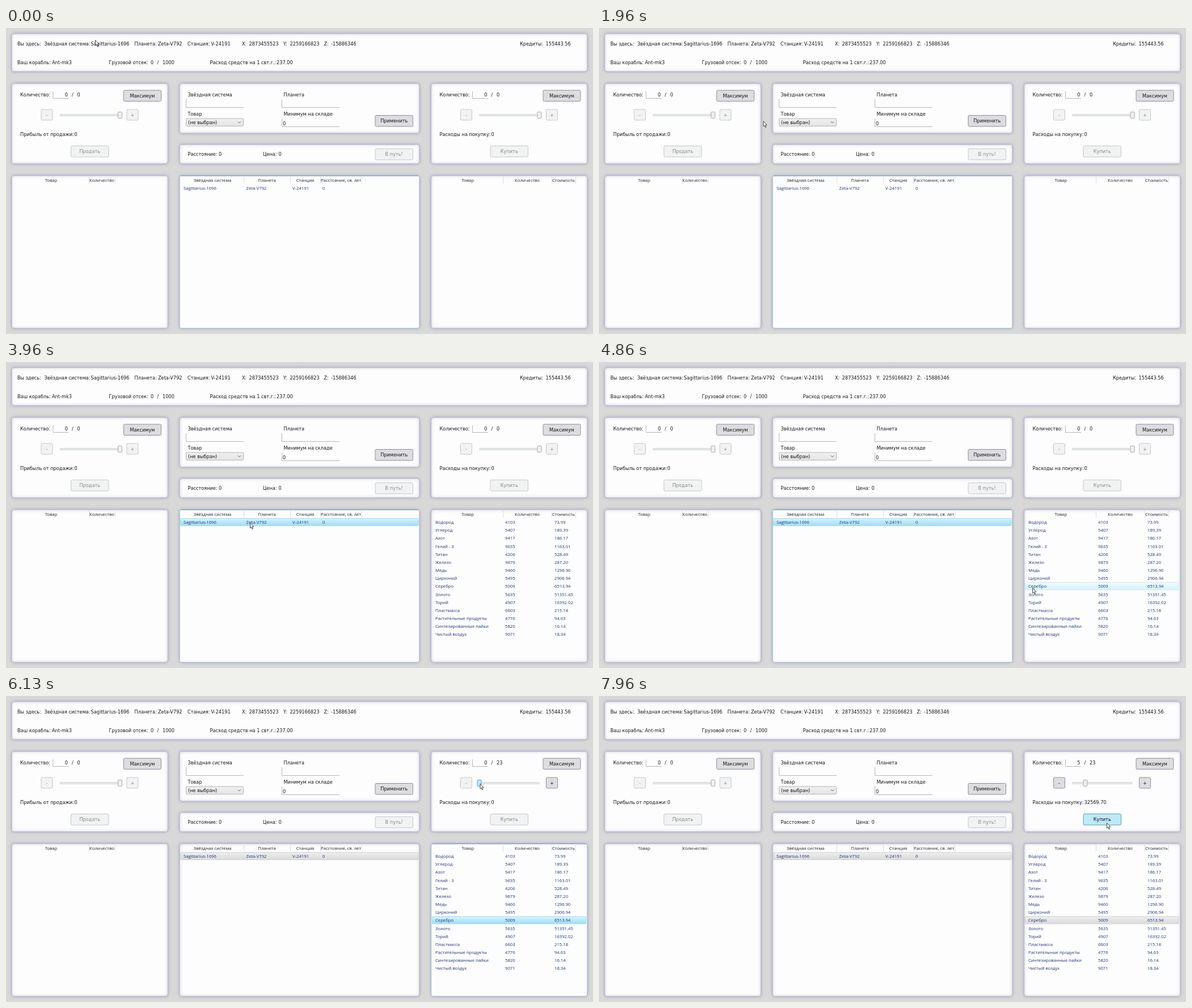
Recreate the animation shown at these times as an HTML page with a canvas. Size 1035x541 px, loop 8 s.

```html
<!DOCTYPE html>
<html lang="ru">
<head>
<meta charset="utf-8">
<style>
html, body { margin: 0; width: 100%; height: 100%; overflow: hidden; background: #d8d8d8; }
canvas { display: block; }
</style>
</head>
<body>
<canvas id="stage" width="1035" height="541"></canvas>
<script>
const g = document.getElementById('stage').getContext('2d');
const LOOP = 8000;
const UI = '8.2px "DejaVu Sans", sans-serif';
const LIST = '7.7px "Open Sans", "Noto Sans", sans-serif';
const INK = '#161616', NAVY = '#1d3282';
const PICK_STATION = 3900, PICK_GOODS = 5100, GRAB = 6250, DROP = 7100;
const PRICE = 6513.94, MAX = 23, STEP = 106 / MAX;

// Pointer stops: time, x, y
const path = [
  [0, 157, 21], [1000, 187, 30], [1700, 225, 70], [2500, 440, 400], [2800, 440, 400],
  [3000, 445, 391], [3600, 432, 300], [3850, 430, 284], [4000, 430, 284],
  [4750, 764, 399], [5150, 764, 399], [5460, 774, 262], [6000, 835, 154],
  [GRAB, 836, 155], [6700, 846, 154], [7050, 860, 156], [7330, 860, 156],
  [7960, 895, 224], [LOOP, 895, 224]
];

const goods = [
  ['Водород', 4103, '73.99'], ['Углерод', 5407, '189.39'], ['Азот', 9417, '186.17'],
  ['Гелий - 3', 9635, '1163.01'], ['Титан', 4206, '528.49'], ['Железо', 9879, '287.20'],
  ['Медь', 9460, '1296.90'], ['Цирконий', 5495, '2906.94'], ['Серебро', 5009, '6513.94'],
  ['Золото', 5635, '51351.45'], ['Торий', 4907, '16392.02'], ['Пластмасса', 6603, '215.18'],
  ['Растительные продукты', 4776, '94.63'], ['Синтезированные пайки', 5820, '16.14'],
  ['Чистый воздух', 9071, '18.34']
];
const SILVER = 8;

const tints = {
  hover: ['#f4fcff', '#d3f1fb', '#c5e8f5'],
  active: ['#d9f4ff', '#9bddf6', '#a5dcee'],
  idle: ['#efefef', '#d9d9d9', '#d2d2d2'],
  head: ['#e0f6ff', '#b9e6fa', '#a9d9ee']
};

let mouse = { x: 0, y: 0 };

function slope(i, k) {
  if (i < 1 || i > path.length - 2) return 0;
  const [a, b, c] = [path[i - 1], path[i], path[i + 1]];
  const p = (b[k] - a[k]) / (b[0] - a[0]), q = (c[k] - b[k]) / (c[0] - b[0]);
  return p * q > 0 ? 2 * p * q / (p + q) : 0;
}

function pointerAt(t) {
  let i = 0;
  while (i < path.length - 2 && path[i + 1][0] <= t) i++;
  const a = path[i], b = path[i + 1], d = b[0] - a[0], u = (t - a[0]) / d;
  const at = k => {
    const s = u * u * (3 - 2 * u);
    return a[k] + (b[k] - a[k]) * s
      + d * u * (1 - u) * (slope(i, k) * (1 - u) - slope(i + 1, k) * u);
  };
  return { x: at(1), y: at(2) };
}

const over = (x, y, w, h) =>
  mouse.x >= x && mouse.x < x + w && mouse.y >= y && mouse.y < y + h;

function text(s, x, y, { font = UI, color = INK, align = 'left' } = {}) {
  g.font = font;
  g.fillStyle = color;
  g.textAlign = align;
  g.fillText(s, x, y + 3);
}

function box(x, y, w, h, r, fill, stroke) {
  g.beginPath();
  g.roundRect(x + .5, y + .5, w - 1, h - 1, r);
  g.fillStyle = fill;
  g.fill();
  g.strokeStyle = stroke;
  g.lineWidth = 1;
  g.stroke();
}

function fade(y, h, [top, bottom]) {
  const f = g.createLinearGradient(0, y, 0, y + h);
  f.addColorStop(0, top);
  f.addColorStop(1, bottom);
  return f;
}

function tinted(x, y, w, h, tint) {
  box(x, y, w, h, 1, fade(y, h, tint), tint[2]);
}

function line(color, ...points) {
  g.beginPath();
  points.forEach(([x, y]) => g.lineTo(x, y));
  g.strokeStyle = color;
  g.lineWidth = 1;
  g.stroke();
}

function panel(x, y, w, h, focused) {
  g.save();
  g.shadowColor = 'rgba(125,125,175,.65)';
  g.shadowBlur = 5;
  box(x, y, w, h, 4, '#fdfdfd', '#c9cad6');
  g.restore();
  if (focused) {
    box(x, y, w, h, 3, '#fdfdfd', '#b4d3e2');
    line('#6fa3b8', [x + 2, y + .5], [x + w - 2, y + .5]);
  }
}

function button(label, x, y, w, h, on) {
  const lit = on && over(x, y, w, h);
  box(x, y, w, h, 2, lit ? '#bee9f8' : on ? '#dddddf' : '#f1f2f2',
    lit ? '#5d9bb8' : on ? '#8c8ca6' : '#c3c7cd');
  text(label, x + w / 2, y + h / 2, { color: on ? INK : '#898989', align: 'center' });
}

function field(x, y, w, h) {
  line('#b4b6bd', [x + .5, y], [x + .5, y + h - .5], [x + w, y + h - .5]);
}

function slider(x, y, thumb, on, lit) {
  box(x, y - 1, 107, 4, 1, '#e7eaea', '#d3d7da');
  box(thumb - 3.5, y - 5, 8, 12, 1, lit ? '#bce6fa' : on ? '#ececec' : '#f0f0f0',
    lit ? '#5aa2cc' : '#a5a8ad');
}

function trade(x, caption, action, value, max, thumb, held) {
  panel(x, 98, 275.5, 142);
  text('Количество:', x + 15, 118);
  field(x + 72.5, 112, 28, 13);
  text(value, x + 99, 118, { align: 'right' });
  text('/', x + 106, 118);
  text(max, x + 115.5, 118);
  button('Максимум', x + 197, 109.5, 67, 20.5, true);
  button('-', x + 51.5, 143.5, 21, 20, value > 0);
  button('+', x + 202.5, 143.5, 21, 20, max > value);
  const lit = max > 0 && (held || over(thumb - 4, 148, 8, 12));
  slider(x + 84.5, 153, thumb, max > 0, lit);
  text(caption, x + 15, 188);
  text(value ? (value * PRICE).toFixed(2) : 0, x + (x > 500 ? 106 : 110.5), 188);
  button(action, x + 104, 208, 67.5, 20.5, value > 0);
}

// Column heads: label, left edge, right edge
function heads(cols) {
  for (const [label, a, b] of cols) {
    if (over(a, 262, b - a, 14)) tinted(a, 262, b - a, 14, tints.head);
    line('#dcdde2', [b + .5, 263], [b + .5, 275]);
    text(label, (a + b) / 2, 269, { font: LIST, align: 'center', color: '#20232b' });
  }
}

function row(x, w, i, cells, picked, focused) {
  const y = 283 + i * 14.17;
  const hot = over(x, y - 7, w, 14);
  const tint = picked ? (focused ? tints.active : tints.idle) : hot && tints.hover;
  if (tint) tinted(x, y - 7, w, 14, tint);
  for (const [s, cx] of cells) text(s, cx, y, { font: LIST, color: NAVY });
}

function header() {
  panel(10, 10, 1015, 67);
  [['Вы здесь:', 20], ['Звёздная система:', 67.5], ['Sagittarius-1696', 149.5],
   ['Планета:', 226.5], ['Zeta-V792', 268], ['Станция:', 320], ['V-24191', 361.5],
   ['X:', 416], ['2873455523', 428.5], ['Y:', 489], ['2259166823', 500.5],
   ['Z:', 560.5], ['-15886346', 573], ['Кредиты:', 906], ['155443.56', 951.5]
  ].forEach(([s, x]) => text(s, x, 28));
  [['Ваш корабль:', 20], ['Ant-mk3', 81], ['Грузовой отсек:', 181.5], ['0', 255],
   ['/', 266.5], ['1000', 276], ['Расход средств на 1 свт.г.:', 359.5], ['237.00', 477]
  ].forEach(([s, x]) => text(s, x, 61));
}

function search() {
  panel(306, 98, 423, 88);
  text('Звёздная система', 320.5, 118);
  text('Планета', 489.5, 118);
  text('Товар', 320.5, 151.5);
  text('Минимум на складе', 489.5, 151.5);
  field(317, 126, 102, 15);
  field(486, 126, 102, 15);
  field(486, 160, 102, 15);
  text('0', 488, 169);
  box(317, 159.5, 102, 14.5, 1, fade(160, 14, ['#f0f0f0', '#e4e4e4']), '#b5b5b8');
  text('(не выбран)', 321, 167);
  line('#555', [409, 165.5], [411.5, 168], [414, 165.5]);
  button('Применить', 650.5, 154, 67.5, 20.5, true);

  panel(306, 206, 423, 34);
  text('Расстояние:', 320.5, 223);
  text('0', 375, 223);
  text('Цена:', 453, 223);
  text('0', 480.5, 223);
  button('В путь!', 650.5, 213, 67.5, 20.5, false);
}

function lists(t) {
  const stationFocus = t < PICK_GOODS, goodsFocus = !stationFocus && t < GRAB;
  panel(10, 261, 275.5, 270);
  heads([['Товар', 13, 146], ['Количество', 146, 192]]);

  panel(306, 261, 423, 270, stationFocus);
  heads([['Звёздная система', 309, 419], ['Планета', 419, 501],
         ['Станция', 501, 554], ['Расстояние, св. лет', 554, 627]]);
  row(307, 420.5, 0, [['Sagittarius-1696', 313], ['Zeta-V792', 423.5],
    ['V-24191', 505], ['0', 558]], t >= PICK_STATION, stationFocus);

  panel(749.5, 261, 275.5, 270, goodsFocus);
  heads([['Товар', 752.5, 876], ['Количество', 876, 962], ['Стоимость', 962, 1004]]);
  if (t < PICK_STATION) return;
  goods.forEach(([name, amount, price], i) =>
    row(751, 272, i, [[name, 757], [amount, 880], [price, 967]],
      i === SILVER && t >= PICK_GOODS, goodsFocus));
}

function pointer({ x, y }) {
  g.beginPath();
  [[.5, .5], [.5, 9.7], [2.5, 7.8], [4, 11.3], [5.4, 10.7], [4, 7.3], [6.7, 7.1]]
    .forEach(([dx, dy]) => g.lineTo(x + dx, y + dy));
  g.closePath();
  g.fillStyle = '#fff';
  g.fill();
  g.strokeStyle = '#333';
  g.lineWidth = .9;
  g.stroke();
}

function draw(t) {
  mouse = pointerAt(t);
  g.fillStyle = '#d8d8d8';
  g.fillRect(0, 0, 1035, 541);
  const chosen = t >= PICK_GOODS;
  const pulled = pointerAt(Math.min(t, DROP)).x - 836;
  const count = t < GRAB ? 0 : Math.max(0, Math.min(5, Math.round(pulled / STEP)));
  header();
  trade(10, 'Прибыль от продажи:', 'Продать', 0, 0, 200.5, false);
  search();
  trade(749.5, 'Расходы на покупку:', 'Купить', count, chosen ? MAX : 0,
    chosen ? 834 + count * STEP : 940, t >= GRAB && t < DROP);
  lists(t);
  pointer(mouse);
}

function tick() {
  draw(performance.now() % LOOP);
  requestAnimationFrame(tick);
}
tick();
</script>
</body>
</html>
```
